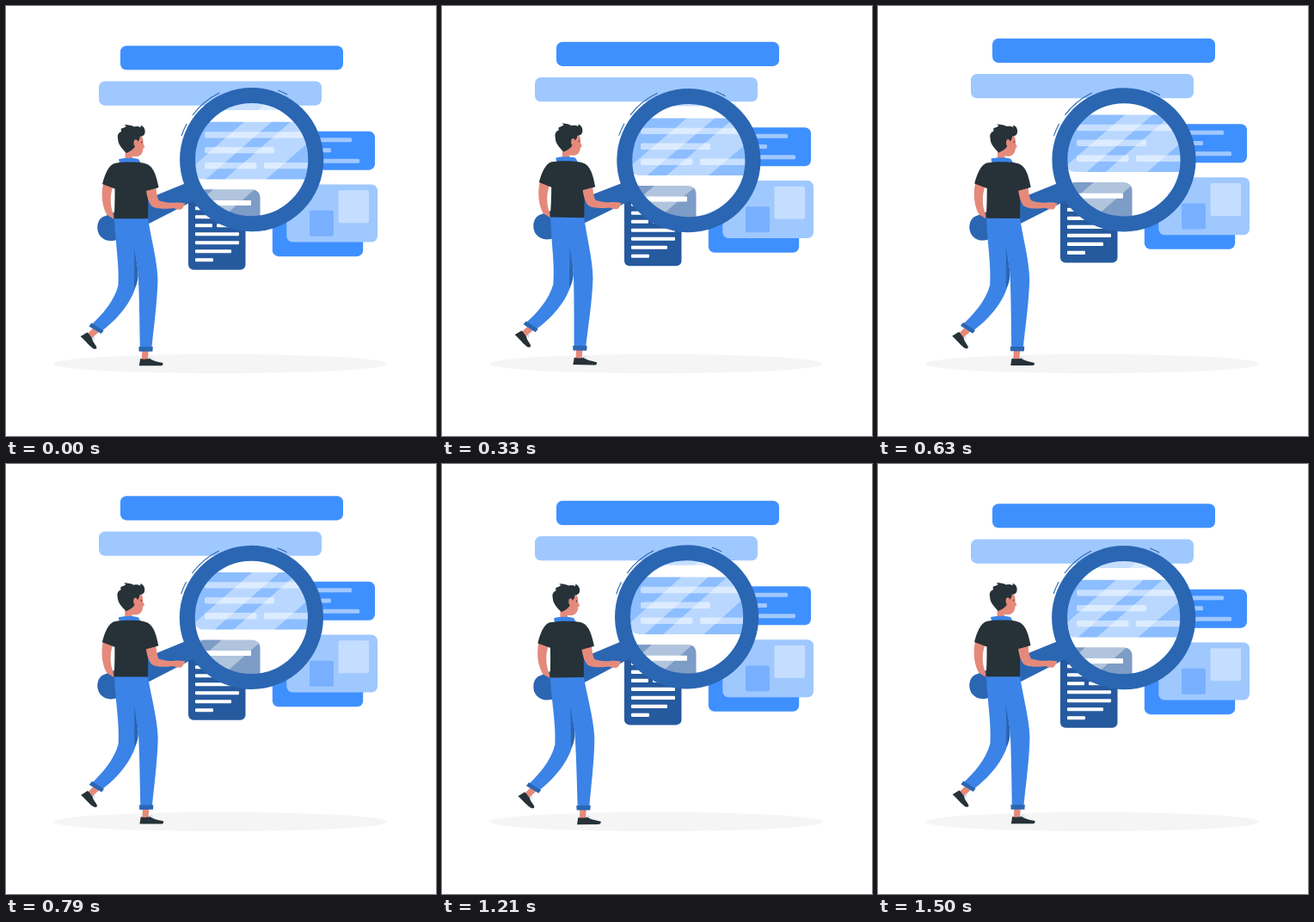
Recreate the animation shown at these times as an HTML page. Size 500 by 500 pixels, loop 1.54 s.

```html
<!DOCTYPE html>
<html lang="en">
<head>
<meta charset="utf-8">
<title>Searching with a magnifying glass</title>
<style>
  html, body { margin: 0; width: 100%; height: 100%; overflow: hidden; background: #fff; }
  svg { display: block; width: 100vw; height: 100vh; }
  .blue { fill: #3f90ff; }
  .pale { fill: #9fc8ff; }
  .navy { fill: #265a9f; }
  .steel { fill: #2b66b3; }
  .white { fill: #fff; }
  .skin { fill: #e58a7b; }
  .dark { fill: #263238; }
  .jeans { fill: #3b83e7; }
</style>
</head>
<body>
<svg viewBox="0 0 500 500">
  <clipPath id="lens"><circle class="sway" cx="285.6" cy="178.6" r="66"/></clipPath>

  <ellipse cx="249.5" cy="416" rx="194" ry="11.2" fill="#f5f5f5"/>

  <g class="float">
    <rect class="blue" x="133" y="46.4" width="259" height="28.2" rx="7"/>
    <rect class="pale" x="108" y="87.7" width="259" height="28.2" rx="7"/>
    <rect class="blue" x="315" y="145.9" width="114" height="45" rx="7"/>
    <g class="pale">
      <rect x="323" y="153.4" width="79" height="5" rx="1.5"/>
      <rect x="323" y="165.6" width="55" height="5" rx="1.5"/>
      <rect x="323" y="177.9" width="88" height="5" rx="1.5"/>
    </g>
    <rect class="blue" x="309.8" y="224.4" width="105.4" height="67" rx="7"/>
    <rect class="pale" x="326.3" y="207.8" width="105.7" height="67" rx="7"/>
    <rect x="386.5" y="214.5" width="35.5" height="38" rx="2" fill="#c5deff"/>
    <rect x="353" y="238" width="28" height="30" rx="2" fill="#78b0ff"/>
    <rect class="navy" x="212" y="215" width="66.5" height="92" rx="6"/>
    <g class="white" id="docLines"></g>
  </g>

  <g clip-path="url(#lens)">
    <rect class="white" x="190" y="90" width="190" height="180"/>
    <g class="float">
      <rect class="pale" x="190" y="80" width="190" height="41.3"/>
      <rect class="blue" x="219" y="135.1" width="170" height="66.6" rx="10"/>
      <g class="pale">
        <rect x="231" y="146.4" width="140" height="7.4" rx="2"/>
        <rect x="231" y="164.2" width="81" height="7.4" rx="2"/>
        <rect x="231" y="182.2" width="60.5" height="7.4" rx="2"/>
        <rect x="300" y="182.2" width="80" height="7.4" rx="2"/>
      </g>
      <rect class="navy" x="198" y="213.6" width="97.5" height="120" rx="9"/>
      <rect class="white" x="210" y="226.3" width="75" height="6" rx="1"/>
    </g>
    <g class="sway white" opacity="1" fill-opacity=".4">
      <rect x="190" y="90" width="190" height="180"/>
      <path d="M305 110H337L177 250H145zM359 110H407L247 250H199z"/>
    </g>
  </g>

  <g class="sway">
    <!-- magnifying glass -->
    <path class="steel" d="M214 204L112 245.5C105 250 104.500 262 110 268C116 274.500 124 274 131 271L221 225z"/>
    <g fill="none" stroke="#2b66b3">
      <circle cx="285.6" cy="178.6" r="74.6" stroke-width="18"/>
      <path stroke-width="1.1" d="M204 151A86.200 86.200 0 0 1 210 137M216.800 127A86.200 86.200 0 0 1 248 101M316 98A86.200 86.200 0 0 1 327 103"/>
    </g>

    <!-- far arm and legs -->
    <path class="skin" d="M113 206C110 220 112 234 117.500 243L126 248L124 240C121 230 121 221 124 211z"/>
    <path class="skin" d="M101 375L108 379L99 387L94 382z"/>
    <path class="dark" d="M86.800 384.500L94.500 379.700C98 382.500 98.500 385 100.500 386.500C100 390 105.500 394.500 105.600 397.500C104.800 399.500 102.500 399 101 398C96 394.500 93 390 86.800 384.500z"/>
    <path class="jeans" d="M126 247C127 275 132 300 130.500 325C126 343 112 359 99 371L110 379C128 366 147 345 152 322L150 247z"/>
    <path class="steel" d="M148.500 279C152 296 154.500 310 153.500 316C153 322 151 326 149.300 329C148.500 312 150 298 148.500 279z"/>
    <path class="steel" d="M99.500 368.700L113.700 377.700L110.700 381.200L96.500 372.500z"/>
    <path class="skin" d="M158.500 400H166L165 412H158z"/>
    <path class="dark" d="M156.300 410C160 411.300 165 410.500 167 409.800C171 413 178 414 182.300 415C183.500 416.500 182 418.300 180 418.300H155z"/>
    <path class="jeans" d="M125.700 246H165C168 268 176 295 176.500 318C176 345 172 372 169.500 398H156C155.500 370 155 330 153.600 310C152 298 150 288 148.500 279L130 262z"/>
    <path class="steel" d="M154.500 396.300H171L170.500 401.700H154.800z"/>
    <path fill="none" stroke="#a9c8ec" stroke-width=".7" d="M165.500 410.500l3-2.300 2 2.300M100.500 386.500l2-2.300v4"/>

    <!-- head -->
    <path class="skin" d="M148 156L157.500 151C160 155 159.500 158 159.500 160L161.300 164C161 165 160 165 159.500 165C159.500 170 157 174.500 152 175C150 175.200 148.500 175 147 174.500V180H138.500V168z"/>
    <path class="dark" d="M140 171C135 166 130 161 130 154C129 150 131 147 134 146C133 143 134 142 136 142C137 141 139 141 139.500 140C139 139 138.500 138.500 137.500 138C142 138 147 139 149 140.500C152 139.500 155 140.500 156 141C157 140.500 157 139.500 156.500 138.500C160 140 162 143 161.500 147C161 151 158 151.500 155.500 152C155.500 156 153 158 151 159C151 164 147 168 140 171z"/>
    <ellipse class="skin" cx="150.800" cy="159.300" rx="2.300" ry="4"/>
    <ellipse class="dark" cx="157.700" cy="158.500" rx=".6" ry="1"/>
    <path class="jeans" d="M131 178C139 176.200 148 176.500 154 178L157 183H132z"/>

    <!-- near arm and shirt -->
    <path class="skin" d="M163 212L174.500 210C175 219 176 224 178 226.500C185 228.500 190 229 195 228.800C199 228 204 228.500 208.500 229.500C207 231 207 233 205 235.500C203 237.500 198 236.800 195 235C187 236 175 236.500 170 233C166 229 164 222 163 212z"/>
    <path class="dark" d="M126 183C136 181 154 181.200 161 183C170 185 174 193 177.500 211L166 214.500C164.500 225 165.500 236 165 247.300H125.500C126.500 236 126.500 224 126.500 212.500L112 207C114.500 197 119 185 126 183z"/>
    <path class="skin" d="M163 215L174 212.500C175 219 176 224 178 226.500L170 233C166 229 164 222 163 215z"/>
  </g>
</svg>
<script>
  const LOOP = 1540, CYCLE = 1500, FPS = 24;
  const all = selector => [...document.querySelectorAll(selector)];
  const floating = all('.float'), swaying = all('.sway');

  // Text rows of the document: [row, x, width]
  const rows = [[0, 220, 51], [1, 220, 51], [2, 220, 20], [2, 245, 26],
                [3, 220, 51], [4, 220, 51], [5, 220, 42], [6, 220, 21]];
  document.getElementById('docLines').innerHTML = rows.map(([row, x, w]) =>
    `<rect x="${x}" y="${233.4 + row * 10}" width="${w}" height="4.1" rx="1"/>`).join('');

  // Triangle wave: 0 at p = 0, 1 at p = .5
  const triangle = p => 1 - Math.abs(1 - 2 * (((p % 1) + 1) % 1));

  function draw(now) {
    const step = Math.floor((now % LOOP + 5) * FPS / 1000);
    const phase = (step * 1000 / FPS + 20) / CYCLE;
    const lift = -10 * triangle(phase);
    const angle = 2 * triangle(phase + .25) - 1;
    floating.forEach(el => el.setAttribute('transform', `translate(0 ${lift})`));
    swaying.forEach(el => el.setAttribute('transform', `rotate(${angle} 228 256)`));
    requestAnimationFrame(() => draw(performance.now()));
  }
  draw(performance.now());
</script>
</body>
</html>
```
